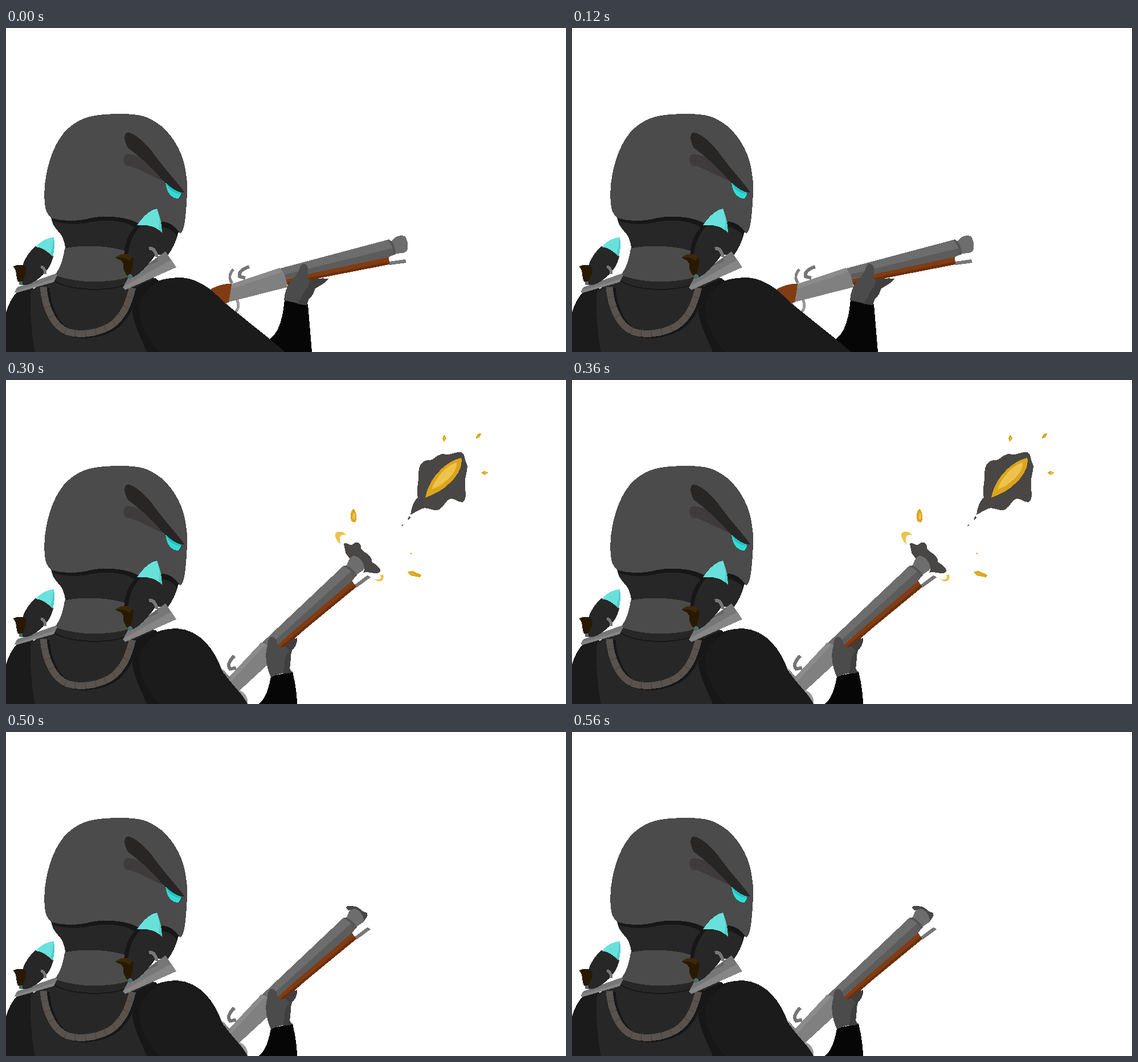
An HTML page for the animation above (0.6 s loop, 983 px wide and 570 px high).

```html
<!DOCTYPE html>
<html lang="en">
<head>
<meta charset="utf-8">
<title>Recoil</title>
<style>
  html, body { margin: 0; width: 100%; height: 100%; overflow: hidden; background: #fff; }
  svg { display: block; width: 983px; height: 570px; shape-rendering: crispEdges; }
  .line { fill: none; }
  .coat { fill: #1b1b1b; } .cloth { fill: #272727; } .shade { fill: #171717; }
  .grey { fill: #4b4b4b; } .steel { fill: #6d6d6d; } .metal { fill: #808080; }
  .smoke { fill: #484745; } .fire { fill: #dba41c; } .glow { fill: #eec24c; }
  .tip { fill: #68e1dd; } .tipShade { fill: #55cbc7; } .fin { fill: #281a02; }
</style>
</head>
<body>
<svg viewBox="0 0 983 570">
  <g id="gun">
    <g class="line" data-steps="0">
      <path stroke="#808080" stroke-width="5" d="M397 449C390 440 393 431 399 425"/>
      <path stroke="#999" stroke-width="5" d="M404 476C410 485 409 495 401 502M383 483L389 490"/>
    </g>
    <path class="line" stroke="#757575" stroke-width="6" d="M427 420C415 424 408 430 410 437L420 440"/>
    <path fill="#813c12" d="M355 462C370 453 383 449 397 450L392 482L381 486Z"/>
    <path fill="#777" d="M672 411L701 407L703 413L673 417Z"/>
    <path fill="#813c12" d="M490 440L672 402L673 416L560 438L494 452Z"/>
    <path fill="#6b2f0f" d="M494 447L673 411L673 416L560 438L494 453Z"/>
    <path class="steel" d="M481 423L672 372C680 378 684 390 682 398L492 442Z"/>
    <path fill="#5c5c5c" d="M488 434L680 387L683 398L672 403L492 441Z"/>
    <path class="steel" d="M675 376L684 368C690 364 700 364 702 369C706 377 707 388 703 393C697 398 690 395 682 398Z"/>
    <path fill="#555" d="M670 373L676 374C682 381 684 390 684 398L679 400C681 391 678 382 670 373Z"/>
    <path class="metal" d="M396 450L480 422C488 427 492 440 494 456L391 482C393 470 395 460 396 450Z"/>
    <path fill="#8b8b8b" d="M396 450L480 422L485 429L396 459Z"/>
  </g>
  <path class="metal" data-steps="1234" d="M378 506L394 524L390 531Z"/>
  <path fill="#999" data-steps="1234" d="M405 545C418 546 426 558 424 570Z"/>

  <g data-steps="0">
    <path fill="#060606" d="M463 547C482 535 487 500 489 477L530 486L537 570H480Z"/>
    <path class="grey" d="M488 479C488 465 495 452 500 445C509 439 515 426 517 418C522 412 529 415 530 423C530 432 528 440 533 444C545 440 555 440 566 441C560 450 548 455 543 458C540 465 539 472 532 476L528 488Z"/>
    <path fill="#3f3f3f" d="M533 444C545 440 555 440 566 441C560 450 548 455 543 458C540 465 539 472 532 476L528 488L510 485C520 478 520 463 531 455Z"/>
    <path class="coat" d="M250 570C220 535 215 505 225 475C242 455 265 439 305 439C330 439 355 455 370 470L387 486L463 547L490 570Z"/>
  </g>
  <g data-steps="1234">
    <path fill="#060606" d="M444 570C456 560 462 540 465 521L503 513C507 530 511 550 511 570Z"/>
    <path class="grey" d="M465 523C457 505 455 490 457 475C460 468 458 458 463 453C470 450 475 455 476 463C480 470 485 473 490 468C498 460 505 455 511 454C512 462 508 470 502 476C498 485 501 497 498 507L502 515C490 514 477 517 465 523Z"/>
    <path fill="#3f3f3f" d="M490 468C498 460 505 455 511 454C512 462 508 470 502 476C498 485 501 497 498 507L502 515L486 517C491 502 486 487 498 477Z"/>
    <path class="coat" d="M250 570C220 535 215 505 225 475C238 455 263 437 300 437C342 440 366 475 378 508C390 531 415 550 424 570Z"/>
  </g>

  <!-- torso -->
  <path class="coat" d="M0 500C5 485 10 474 20 464L48 455L60 570H0Z"/>
  <path class="cloth" d="M44 462L88 432H215L262 440C228 465 220 490 226 515L247 570H51C44 535 41 490 44 462Z"/>
  <path class="shade" d="M225 457L262 440L270 446C248 455 234 475 234 492C234 521 250 550 270 570H247C235 540 220 515 222 490Z"/>
  <path class="line" stroke="#171717" stroke-width="2" d="M85 445C115 463 180 465 217 449"/>
  <defs><path id="cord" d="M65.500 455C68 490 82 521 103 532C120 541 155 540 182 525C207 508 215 485 222 457"/></defs>
  <g class="line" stroke-width="12">
    <use href="#cord" stroke="#171717" x="5" y="2"/>
    <use href="#cord" stroke="#5a524d"/>
    <use href="#cord" stroke="#443d39" stroke-dasharray="1 17"/>
  </g>

  <!-- head -->
  <path class="cloth" d="M79 332C81 350 92 356 98 366C102 374 103 380 105 390L208 396L284 400C292 390 299 375 303 358L275 335L150 325Z"/>
  <path class="grey" d="M103 388C130 381 180 382 212 393L216 438C185 448 130 451 86 435C97 420 101 402 103 388Z"/>
  <path class="grey" stroke="#4b4b4b" stroke-width="1.500" d="M80 334C71 325 68 318 68 290C69 255 80 212 102 185C125 159 150 152 195 152C235 151 250 156 272 173C295 192 312 225 315 255C319 275 317 300 315 325C313 345 311 357 306 360L302 358C295 348 288 344 275 341L232 346C215 333 175 329 150 335C130 341 100 342 80 334Z"/>
  <path class="shade" d="M79 334C100 341 130 340 150 334C175 329 215 332 234 345L228 352C210 338 175 337 150 341C125 348 100 345 81 339ZM274 340C288 342 297 349 303 358L300 366C294 356 285 351 274 350Z"/>
  <path fill="#3f3b3c" d="M208 224C215 218 245 228 262 245L284 267L281 271C255 262 230 243 210 242C206 238 206 228 208 224Z"/>
  <path fill="#32dad8" d="M280 267L307 289C307 294 305 298 302 300C290 300 280 288 280 267Z"/>
  <path fill="#20c4c3" d="M280 267L307 289L304 292C295 291 286 285 281 276Z"/>
  <path fill="#272624" d="M211 184C222 182 245 200 262 225C280 250 300 270 313 289C300 291 285 278 270 262C250 240 232 224 214 211C208 200 206 190 211 184Z"/>

  <!-- right rocket -->
  <path fill="#777" d="M280 393L299 421L209 461L205 457L214 440Z"/>
  <path fill="#868686" d="M206 455L290 408L299 421L209 461Z"/>
  <path fill="#666" d="M244 420L267 403L266 411Z"/>
  <path class="cloth" d="M231 346L274 359C275 380 265 400 250 415C238 430 225 440 216 440C208 430 205 400 210 380C215 365 222 352 231 346Z"/>
  <path class="shade" d="M231 346L237 347C222 362 214 385 214 405L208 405C205 383 216 357 231 346Z"/>
  <path class="tip" d="M230 347C240 332 252 320 265 318C270 330 274 345 274 361C265 350 250 345 230 347Z"/>
  <path class="tipShade" d="M265 318C270 330 274 345 274 361L268 354C271 341 268 328 265 318Z"/>
  <path class="line" stroke="#777" stroke-width="6" d="M251 388C258 386 263 393 265 403"/>
  <path class="fin" d="M191 405C200 396 212 395 222 402C226 412 221 426 217 437H214C208 430 205 425 206 415C202 408 197 405 191 405Z"/>
  <path fill="#392909" d="M191 405C200 396 212 395 222 402L217 410C208 403 200 403 191 405Z"/>
  <circle cx="218" cy="437" r="4" fill="#4b6d66"/>

  <!-- left rocket -->
  <path fill="#777" d="M15 464L20 456L87 432L90 435L84 447L18 466Z"/>
  <path fill="#868686" d="M15 463L86 441L84 447L18 466Z"/>
  <path class="cloth" d="M52 384L66 380L83 402C79 421 65 438 45 449C37 453 29 453 25 451C23 444 26 435 28 424C30 408 42 392 52 384Z"/>
  <path class="tip" d="M52 385C62 373 75 369 84 368C86 380 85 392 82 403C73 392 63 386 52 385Z"/>
  <path class="tipShade" d="M84 368C86 380 85 392 82 403L78 398C82 390 81 378 84 368Z"/>
  <path class="line" stroke="#777" stroke-width="5" d="M61 420C66 420 69 426 69 433"/>
  <path class="fin" d="M12 420C20 415 30 416 35 420C38 430 33 440 26 449L21 446C16 435 20 425 12 420Z"/>
  <circle cx="26" cy="449" r="3.500" fill="#4b6d66"/>

  <!-- smoke around the muzzle -->
  <g class="smoke">
    <path data-steps="2" d="M593 288C600 284 604 295 610 288C616 283 624 286 623 297C630 305 643 308 642 320C650 325 660 332 656 338C648 344 636 335 627 339C634 328 622 310 610 309L603 314L596 304Z"/>
    <path data-steps="3" d="M593 296C600 301 605 298 608 300L612 295L618 296L621 307L629 306L632 317C640 321 640 334 634 336L625 337C634 326 622 310 611 309L602 315L599 306Z"/>
    <path data-steps="4" d="M596 309C600 303 608 307 614 307C622 309 624 317 634 318C637 326 630 328 628 334C629 324 620 310 610 311L602 314Z"/>
  </g>

  <!-- muzzle flash -->
  <g data-steps="1">
    <g class="fire">
      <path d="M674 267C676 245 690 215 707 198L705 190L713 192C730 173 750 163 772 164C775 185 765 210 742 235L734 247L730 242C712 256 695 266 674 268Z"/>
      <path d="M610 237C616 245 622 253 626 264L624 285L619 281L615 292L611 284L606 288L604 272L599 269C602 257 605 245 610 237Z"/>
      <path d="M673 296L683 289C690 291 692 296 690 300C684 301 678 300 673 296Z"/>
      <path d="M657 323C668 316 685 317 688 320L699 334L697 338L668 337L669 331L658 328Z"/>
      <path d="M767 123C772 130 773 138 770 146L767 153L764 146L759 143C760 133 762 127 767 123Z"/>
      <path d="M792 143C793 130 802 119 813 115C817 121 813 132 804 139L793 146Z"/>
      <path d="M788 171L793 165L808 164L808 169L792 174Z"/>
    </g>
    <g class="glow">
      <path d="M691 251C694 230 705 212 712 207L711 200L718 200C730 186 745 176 759 178C764 195 750 215 738 225L731 238L720 236L717 242L705 246Z"/>
      <path d="M611 251C616 257 619 265 621 272L618 279L614 275L611 282L606 270Z"/>
      <path d="M667 324L685 321L696 333L680 333L674 330Z"/>
      <path d="M767 128C770 134 770 139 767 143L763 140Z"/>
      <path d="M796 139C799 128 805 121 812 119C812 128 805 135 796 139Z"/>
      <path d="M793 170L797 167L806 166L804 169Z"/>
    </g>
  </g>

  <g data-steps="2">
    <path class="smoke" d="M710 237C712 220 718 210 723 207C719 195 725 180 724 165C724 150 730 142 740 141C750 144 755 130 768 130C780 134 785 126 800 127C806 130 804 140 809 148C812 158 804 172 806 185C806 195 809 210 803 214C795 218 788 207 780 209C770 212 770 225 757 229C745 230 738 221 727 228ZM705 245L708 239L710 242L706 246ZM692 258L697 254L697 256Z"/>
    <g class="fire">
      <path d="M736 207C740 180 765 145 799 137C803 150 793 170 776 184C765 195 750 202 736 207Z"/>
      <path d="M769 96L773 102L769 109L766 103ZM825 102C826 96 830 93 834 94C834 99 830 102 825 103ZM834 163L840 160L847 163L840 167Z"/>
      <path d="M610 226C615 231 617 243 613 251L607 249C603 241 604 232 610 226ZM705 337L714 336L729 343L727 347L710 344ZM708 304L713 305L712 307Z"/>
    </g>
    <g class="glow">
      <path d="M747 193C752 175 772 150 791 145C793 157 780 172 768 181C760 189 755 188 747 193Z"/>
      <path d="M769 99L771 103L769 106ZM828 100L832 96L831 99ZM838 163L844 162L841 165Z"/>
      <path d="M610 232C614 236 615 242 611 247L608 242ZM709 339L725 344L713 342Z"/>
      <path d="M578 270C585 264 593 267 597 273C587 270 582 277 588 289C580 285 578 277 578 270ZM662 342C666 353 656 359 646 350C654 353 661 350 657 343Z"/>
    </g>
  </g>

  <g data-steps="3">
    <path class="smoke" d="M806 122C809 113 814 104 807 94L813 93L820 84C823 78 819 74 821 71L829 74L845 73L844 79L846 87L854 97L840 98L834 104L825 104L818 113Z"/>
    <path class="glow" d="M817 101L824 90L826 83L840 76L840 84L833 95L824 104L822 100Z"/>
    <path class="line" stroke="#eec24c" stroke-width="2" d="M583 279C581 270 587 268 592 270M652 353C658 356 663 352 661 347"/>
    <path class="glow" d="M837 26h2v2h-2ZM877 36h2v1h-2ZM896 84h3v1h-3ZM609 178h1v6h-1ZM804 366h7v1h-7Z"/>
  </g>
</svg>
<script>
  const gun = document.getElementById("gun");
  const parts = document.querySelectorAll("[data-steps]");
  const raised = "translate(387.5 526.5) rotate(-28.5) translate(-396 -450)";

  // The aim holds for 200 ms, then every pose lasts 100 ms.
  function draw() {
    const time = performance.now() % 600;
    const step = Math.max(0, Math.floor(time / 100) - 1);
    gun.setAttribute("transform", step ? raised : "");
    for (const part of parts)
      part.style.display = part.dataset.steps.includes(step) ? "" : "none";
    requestAnimationFrame(draw);
  }
  draw();
</script>
</body>
</html>
```
